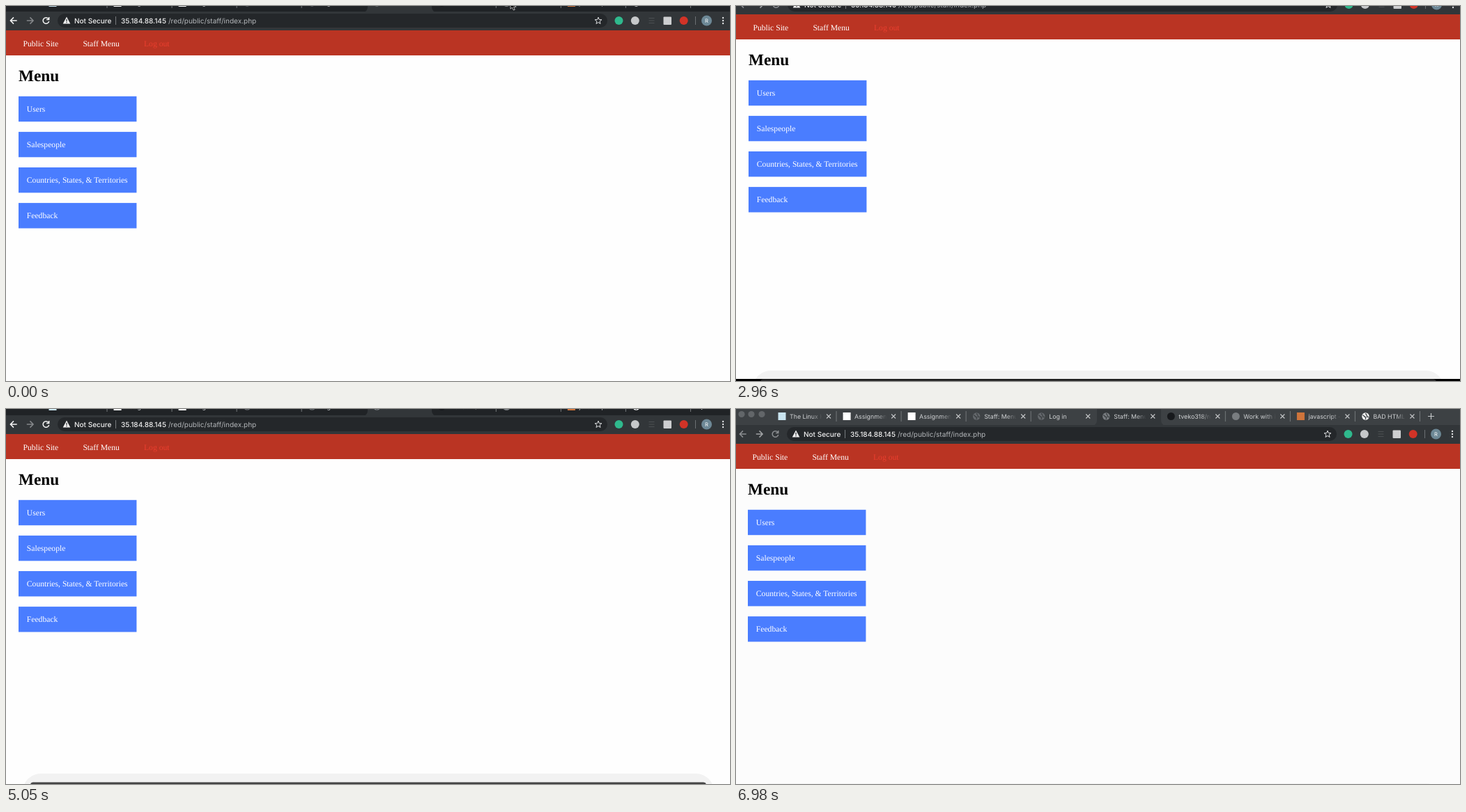
Animation of 1039 by 539 pixels, one loop 8 s. Source, as an HTML page:

```html
<!DOCTYPE html>
<html lang="en">
<head>
<meta charset="utf-8">
<title>Staff menu</title>
<style>
  html, body { margin: 0; width: 100%; height: 100%; overflow: hidden; background: #fefefe; }
  svg { display: block; width: 100vw; height: 100vh; text-rendering: geometricPrecision; }
  .ui { font: 10px Inter, Roboto, sans-serif; }
  .page { font: 11.65px "Liberation Serif", "Times New Roman", serif; fill: #fff; }
</style>
</head>
<body>
<svg id="stage" viewBox="0 0 1039 539">
  <defs>
    <linearGradient id="fade" gradientUnits="userSpaceOnUse" x1="25" x2="72">
      <stop offset=".68" stop-color="#d0d2d4"/>
      <stop offset="1" stop-color="#d0d2d4" stop-opacity="0"/>
    </linearGradient>
  </defs>
  <rect id="paper" width="1039" height="539"/>
  <g id="screen">
    <rect id="strip" x="-2" y="-10" width="1045" height="34"/>
    <g id="tabs" class="ui"></g>
    <rect x="-2" y="23" width="1045" height="27" fill="#323639"/>
    <g id="bar" class="ui"></g>
    <rect x="-2" y="50" width="1045" height="36" fill="#ba3423"/>
    <g id="page" class="page"></g>
  </g>
  <g id="dock">
    <rect x="24" width="992" height="60" rx="26" fill="#f2f2f2"/>
    <rect id="void" x="-2" y="12" width="1045" height="40" fill="#000"/>
    <rect id="shelf" x="35" y="12.5" width="970" height="40" rx="4"/>
  </g>
  <path id="cursor" d="M0 0V11.2L2.5 8.9L4.3 13L6.2 12.2L4.5 8.2H8Z" fill="#000" stroke="#fff" stroke-width=".7"/>
</svg>
<script>
const LOOP = 8000;
const $ = id => document.getElementById(id);

function add(parent, name, attrs, text) {
  const el = document.createElementNS("http://www.w3.org/2000/svg", name);
  for (const key in attrs) el.setAttribute(key, attrs[key]);
  if (text) el.textContent = text;
  parent.appendChild(el);
  return el;
}
const label = (parent, x, y, text, attrs) => add(parent, "text", { x, y, ...attrs }, text);
const dot = (parent, cx, cy, r, fill) => add(parent, "circle", { cx, cy, r, fill });
const box = (parent, x, y, width, height, fill, rx = 0) =>
  add(parent, "rect", { x, y, width, height, fill, rx });
const line = (parent, d, stroke, width = 1) =>
  add(parent, "path", { d, stroke, "stroke-width": width, fill: "none" });

function globe(parent, color) {
  dot(parent, 14.5, 10.5, 5.2, color);
  add(parent, "path", {
    d: "M10.5 9C13 9 12 11.5 14 11.5S14 14 14.5 15M15 6C14 8.5 17 8 16.5 10S18.5 11 19 12",
    stroke: "#3c4043", "stroke-width": 1.3, fill: "none"
  });
}

const square = color => g => box(g, 9, 5, 11, 11, color);
const disc = color => g => dot(g, 14.5, 10.5, 5.5, color);
const world = color => g => globe(g, color);

function buildTabs() {
  const root = $("tabs");
  for (const x of [9, 23, 38]) dot(root, x, 7.5, 4.6, "#626669");
  add(root, "path", {
    d: "M512 24Q519 23 519 16V-6H611V16Q611 23 618 24Z", fill: "#323639"
  });
  const tabs = [
    ["The Linux Kit", square("#c9e4f0")],
    ["Assignments", square("#fff")],
    ["Assignments", square("#fff")],
    ["Staff: Menu", world("#63676b")],
    ["Log in", world("#63676b")],
    ["Staff: Menu", world("#777b7f")],
    ["tveko318/red", disc("#17191c")],
    ["Work with items", disc("#797d80")],
    ["javascript - How", square("#cf743b")],
    ["BAD HTML", world("#f4f4f4")]
  ];
  tabs.forEach(([title, icon], i) => {
    const g = add(root, "g", { transform: `translate(${52.5 + 93.05 * i})` });
    icon(g);
    label(g, 25.5, 13.5, title, { "font-size": 8.8, fill: "url(#fade)" });
    line(g, "M78.5 7.5l6 6m0 -6l-6 6", "#c3c5c7", 1.1);
    if (i !== 4 && i !== 5) line(g, "M92.5 3V18", "#74787b");
  });
  line(root, "M994 10.5h9m-4.5 -4.5v9", "#c3c5c7", 1.2);
}

function buildBar() {
  const root = $("bar");
  const arrow = dir => `M${-4.7 * dir} 0H${4.7 * dir}M0 -4.6L${-4.6 * dir} 0L0 4.6`;
  const icon = (id, x, d) => {
    const el = line(root, d, "#fff", 1.5);
    el.id = id;
    el.setAttribute("transform", `translate(${x} 36)`);
  };
  icon("back", 11, arrow(1));
  icon("next", 34.5, arrow(-1));
  icon("reload", 57.5, "M3.4 -2.6A4.3 4.3 0 1 0 4.2 1M4.2 -5V-1.4H.6");

  box(root, 74, 26, 789, 20, "#24272a", 10);
  add(root, "path", { d: "M87 30.6L92.3 40.4H81.7Z", fill: "#f1f1f1" });
  line(root, "M87 33.8v3.4m0 .9v1.2", "#24272a", 1.2);
  label(root, 98, 39.6, "Not Secure", { fill: "#f1f1f1", "font-weight": 500 });
  line(root, "M157.5 30V42", "#777b7e");
  label(root, 165, 39.6, "35.184.88.145", { fill: "#f1f1f1", "font-weight": 500 });
  label(root, 233, 39.6, "/red/public/staff/index.php", { fill: "#b4b7ba" });

  const points = Array.from({ length: 10 }, (_, i) => {
    const r = i % 2 ? 2.2 : 5.2, a = Math.PI * (i / 5 - .5);
    return `${850 + r * Math.cos(a)},${36.3 + r * Math.sin(a)}`;
  });
  add(root, "polygon", { points: points.join(" "), fill: "none", stroke: "#d8dadc" });

  dot(root, 879.5, 36, 6, "#2fb98d");
  dot(root, 902.8, 36, 6, "#c6c8ca");
  line(root, "M922.5 32.5h8m-8 3.5h8m-8 3.5h8", "#4c5053", 1.1);
  box(root, 943.5, 30.5, 11.5, 11.5, "#cdced0", 1);
  dot(root, 972.7, 36, 6, "#d23327");
  line(root, "M989.5 30V42", "#6c7073");
  dot(root, 1005.5, 36, 7.5, "#6d8896");
  label(root, 1005.5, 38.8, "R", { "font-size": 7.6, "text-anchor": "middle", fill: "#fff" });
  for (const y of [32, 36, 40]) dot(root, 1029, y, 1.2, "#dfe1e3");
}

function buildPage() {
  const root = $("page");
  label(root, 24.5, 73, "Public Site");
  label(root, 110.4, 73, "Staff Menu");
  label(root, 198, 73, "Log out", { fill: "#ea3f2f" });
  label(root, 18, 123, "Menu", { "font-size": 23.3, "font-weight": 700, fill: "#000" });
  ["Users", "Salespeople", "Countries, States, & Territories", "Feedback"].forEach((text, i) => {
    const y = 144.8 + 51.1 * i;
    box(root, 18, y, 169.4, 36.4, "#4a7dff");
    label(root, 29.8, y + 22.1, text);
  });
}

// Each track lists [start ms, values...]; a value holds until the next start.
const scroll = [
  [0, 0, -15], [2660, 0, -26], [2810, 0, -35], [2960, 0, -38], [4600, 0, -27],
  [4750, 0, -19], [4900, 0, -15], [5050, 0, -14], [5790, 0, -11], [5940, 0, -5],
  [6240, -1, -2], [6380, -1, -1], [6980, -1, 0]
];
const pointer = [
  [0, 724, -7], [450, 625, 36], [590, 609, 39], [740, 606, 39], [880, 502, 116],
  [1030, 545, 167], [1180, 547.5, 167.5], [1630, 552, 143], [1770, 616.5, 14],
  [2070, 625, -6], [2220, 625, -40]
];
const dockTop = [[0, 560], [2960, 524], [5790, 526], [5940, 538]];
const at = (track, t) => track.filter(k => k[0] <= t).pop().slice(1);

function draw(t) {
  const active = t < 2530 || (t >= 4460 && t < 5790);
  const lifted = t >= 2960 && t < 4600;
  const paint = (id, attr, value) => $(id).setAttribute(attr, value);
  const move = (id, x, y) => paint(id, "transform", `translate(${x} ${y})`);

  move("screen", ...at(scroll, t));
  move("cursor", ...at(pointer, t));
  move("dock", 0, at(dockTop, t)[0]);

  paint("paper", "fill", t < 5790 ? "#fefefe" : "#fcfcfc");
  paint("strip", "fill", active ? "#202326" : "#3d4144");
  paint("back", "stroke", active ? "#f4f4f4" : "#8b8e91");
  paint("next", "stroke", active ? "#85888b" : "#a0a3a5");
  paint("reload", "stroke", active ? "#f4f4f4" : "#8b8e91");
  paint("void", "visibility", lifted ? "visible" : "hidden");
  paint("shelf", "fill", lifted ? "#2c2c2c" : "#444");
}

buildTabs();
buildBar();
buildPage();
const start = performance.now();
(function tick() {
  draw((performance.now() - start) % LOOP);
  requestAnimationFrame(tick);
})();
</script>
</body>
</html>
```
